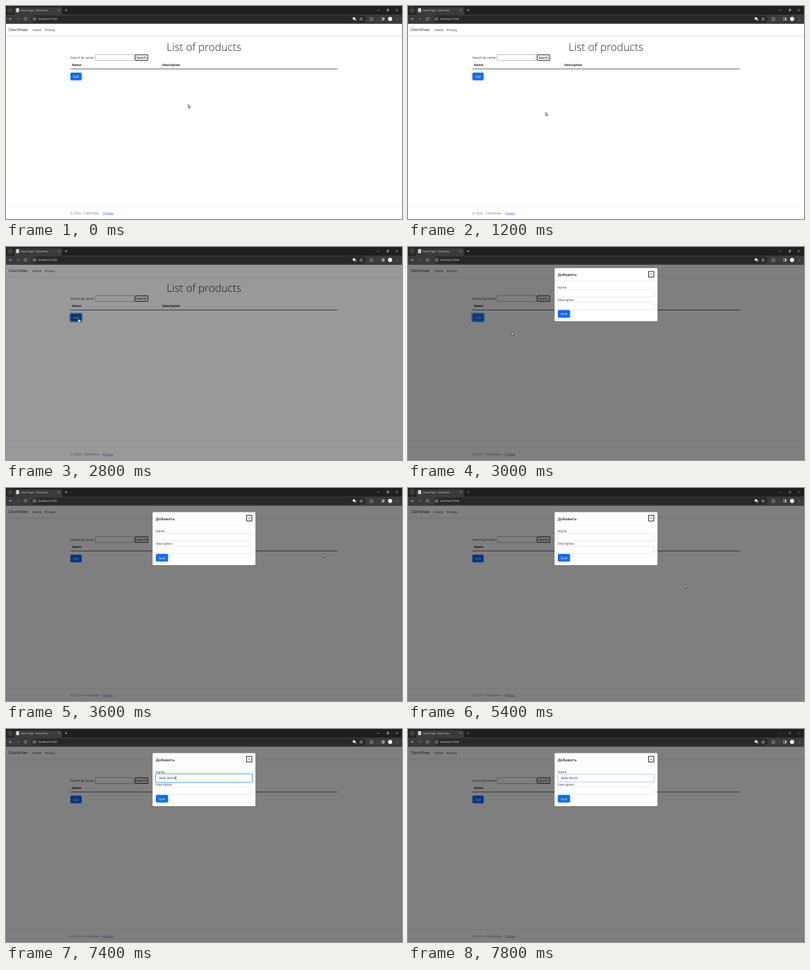
An HTML page with a canvas for the animation above (8 s loop, 600 by 323 pixels).

```html
<!DOCTYPE html>
<html lang="en">
<head>
<meta charset="utf-8">
<title>List of products</title>
<style>
html, body { margin: 0; width: 100%; height: 100%; overflow: hidden; background: #fff; }
canvas { display: block; width: 600px; height: 323px; }
</style>
</head>
<body>
<canvas id="stage"></canvas>
<script>
const W = 600, H = 323, LOOP = 8000, STEP = 200;
const INK = '#212529', BLUE = '#0d6efd', RING = '#258cfb', RULE = '#dee2e6';
const FONT = '"Open Sans", "Noto Sans", sans-serif';
const canvas = document.getElementById('stage');
const ctx = canvas.getContext('2d');
const dpr = window.devicePixelRatio || 1;
canvas.width = W * dpr;
canvas.height = H * dpr;

function text(str, x, y, { size = 4.7, color = INK, weight = 400, align = 'left' } = {}) {
  ctx.font = `${weight} ${size}px ${FONT}`;
  ctx.textAlign = align;
  ctx.fillStyle = color;
  ctx.fillText(str, x, y);
}

function rect(x, y, w, h, color) {
  ctx.fillStyle = color;
  ctx.fillRect(x, y, w, h);
}

function box(x, y, w, h, r, fill, stroke, width = 0.5) {
  ctx.beginPath();
  ctx.roundRect(x, y, w, h, r);
  if (fill) { ctx.fillStyle = fill; ctx.fill(); }
  if (stroke) { ctx.strokeStyle = stroke; ctx.lineWidth = width; ctx.stroke(); }
}

// Strokes an SVG path placed at x, y
function icon(path, x, y, color, width = 0.6, fill) {
  ctx.save();
  ctx.translate(x, y);
  const p = new Path2D(path);
  if (fill) { ctx.fillStyle = fill; ctx.fill(p); }
  ctx.strokeStyle = color;
  ctx.lineWidth = width;
  ctx.stroke(p);
  ctx.restore();
}

function dot(x, y, r, color) {
  ctx.beginPath();
  ctx.arc(x, y, r, 0, Math.PI * 2);
  ctx.fillStyle = color;
  ctx.fill();
}

function focusRing(x, y, w, h, strength) {
  if (!strength) return;
  const grow = 1.25 * strength;
  ctx.globalAlpha = strength;
  box(x - grow, y - grow, w + 2 * grow, h + 2 * grow, 2.2, RING);
  box(x - 0.5, y - 0.5, w + 1, h + 1, 1.6, '#fff');
  ctx.globalAlpha = 1;
}

function drawBrowser(active) {
  const light = '#d6d6d6', frame = active ? '#e3e3e3' : '#858585';
  rect(0, 0, W, 13, '#1f1f1f');
  rect(0, 13, W, 14, '#3b3b3b');
  box(1.6, 1.6, 9.6, 9.6, 3, '#363636');
  icon('M-1.2 -.6 L0 .6 L1.2 -.6', 6.4, 6.4, light);
  box(12.5, 2, 72.5, 12, [3, 3, 0, 0], '#3b3b3b');
  box(15.4, 3.6, 4.3, 5.6, 0.4, '#f4f4f4');
  icon('M.8 2 H2.4 M.8 3.1 H3.4 M.8 4.2 H3.4', 15.4, 3.6, '#777', 0.4);
  text('Home Page - ClientView', 22.3, 7.9, { size: 3.65, color: '#e3e3e3' });
  icon('M-1.2 -1.2 L1.2 1.2 M1.2 -1.2 L-1.2 1.2', 80.3, 6.4, light, 0.5);
  icon('M-1.7 0 H1.7 M0 -1.7 V1.7', 91.2, 6.3, frame);
  icon('M-1.6 0 H1.6', 564, 6.4, frame, 0.5);
  icon('M-1.5 -.6 H.7 V1.6 H-1.5 Z M-.6 -.6 V-1.5 H1.6 V.7 H.7', 578.4, 6.2, frame, 0.5);
  icon('M-1.6 -1.6 L1.6 1.6 M1.6 -1.6 L-1.6 1.6', 592.3, 6.2, frame, 0.5);

  icon('M2 0 H-1.9 M-.1 -1.8 L-1.9 0 L-.1 1.8', 7, 19.6, light);
  icon('M-2 0 H1.9 M.1 -1.8 L1.9 0 L.1 1.8', 18.2, 19.6, '#7d7d7d');
  icon('M1.5 -1.1 A1.9 1.9 0 1 0 1.8 .6 M1.9 -2.1 V-.6 H.4', 29.4, 19.6, light);
  box(38, 14.3, 507, 11, 5.5, '#282828');
  dot(43, 19.7, 4.1, '#3b3b3b');
  icon('M-1.8 -1 H.3 M1.8 1 H-.3', 43, 19.7, light, 0.5);
  icon('M1.8 -1 A.6 .6 0 1 0 .6 -1 A.6 .6 0 1 0 1.8 -1 M-.6 1 A.6 .6 0 1 0 -1.8 1 A.6 .6 0 1 0 -.6 1', 43, 19.7, light, 0.45);
  text('localhost:7244', 49, 21.3, { size: 4.2, color: '#e8e8e8' });
  box(525.4, 16.9, 3.6, 4.2, 0.4, light);
  icon('M-.9 -1.4 H1.1 V1.8 H-1.6 M-.2 .9 L.4 -.6 L1 .9', 529.5, 20.4, light, 0.45);
  icon('M0 -2.3 L.7 -.7 L2.3 -.6 L1.1 .5 L1.5 2.1 L0 1.2 L-1.5 2.1 L-1.1 .5 L-2.3 -.6 L-.7 -.7 Z', 538, 19.7, light, 0.55);
  icon('M-2 -1.4 H-.7 A.7 .7 0 0 1 .7 -1.4 H1.6 V-.3 A.7 .7 0 0 1 1.6 1.1 V2.1 H-2 Z', 553.8, 19.6, light);
  rect(562.2, 17.2, 0.4, 5, '#5c5c5c');
  icon('M-2 -1.9 H2 V1.9 H-2 Z', 571, 19.6, light);
  rect(571.4, 17.7, 1.6, 3.8, light);
  dot(582, 19.6, 3.1, '#fff');
  for (const dy of [-1.7, 0, 1.7]) dot(593, 19.6 + dy, 0.45, light);
}

function drawPage({ addColor, addRing }) {
  rect(0, 27, W, H - 27, '#fff');
  const shade = ctx.createLinearGradient(0, 44.6, 0, 50);
  shade.addColorStop(0, '#f3f3f3');
  shade.addColorStop(1, '#fff');
  rect(0, 44.6, W, 5.4, shade);
  rect(0, 44.5, W, 0.4, RULE);
  text('ClientView', 3.8, 38.4, { size: 6 });
  text('Home', 40.2, 38);
  text('Privacy', 58.8, 38);

  text('List of products', 300, 67.7, { size: 16.3, weight: 300, align: 'center' });
  text('Search by name:', 97.6, 80);
  box(135.2, 73.7, 58.8, 9, 0.5, '#fff', '#767676');
  box(195.9, 73.9, 19, 8.7, 0, '#efefef', '#111', 0.85);
  text('Search', 205.4, 80, { color: '#000', align: 'center' });
  text('Name', 99.9, 91.1, { weight: 700, color: '#111' });
  text('Description', 237, 91.1, { weight: 700, color: '#111' });
  rect(97.5, 95.3, 405, 0.7, INK);
  focusRing(97.5, 101, 17.2, 11.7, addRing);
  box(97.5, 101, 17.2, 11.7, 1.7, addColor);
  text('Add', 106.1, 108.6, { color: '#fff', align: 'center' });

  rect(0, 303.8, W, 0.4, '#ced4da');
  text('© 2024 - ClientView -', 97.6, 315.6, { size: 4.8, color: '#6c757d' });
  text('Privacy', 147, 315.6, { color: BLUE });
  rect(147, 316.2, 15.2, 0.4, BLUE);
}

function drawModal(top, { ring, value, caret }) {
  ctx.save();
  ctx.translate(0, top);
  box(222, 0, 156, 80.4, 1.4, '#fff', 'rgba(0,0,0,.2)', 0.3);
  text('Добавить', 227, 12, { size: 5.85, weight: 600 });
  box(364.4, 4.9, 8.2, 8.7, 0, '#efefef', '#111', 0.9);
  icon('M-1 -1 L1 1 M1 -1 L-1 1', 368.5, 9.4, '#222', 0.5);
  rect(222, 19.3, 156, 0.4, RULE);
  text('Name', 227, 30.7);
  text('Description', 227, 49.8);
  focusRing(227.1, 32.2, 145.7, 11.6, ring);
  box(227.1, 32.2, 145.7, 11.6, 1.5, '#fff', ring ? '#86b7fe' : '#ced4da');
  box(227.1, 51.5, 145.7, 11.6, 1.5, '#fff', '#ced4da');
  box(227, 63.4, 18.6, 11.7, 1.7, BLUE);
  text('Save', 236.3, 71, { color: '#fff', align: 'center' });
  text(value, 231.4, 39.9);
  if (caret) rect(value ? 257.2 : 231.3, 34.6, 0.5, 6.6, '#000');
  ctx.restore();
}

const SHAPES = {
  arrow: 'M0 0 V5 L1.2 4 L2 5.7 L2.8 5.4 L2.1 3.7 H3.6 Z',
  hand: 'M-.4 0 Q.2 -.5 .6 0 V1.9 L2.9 2.5 Q3.4 2.8 3.2 3.8 L2.7 6 H-.3 L-2 3.7 Q-2 2.9 -1.3 3.2 L-.4 3.8 Z'
};

function drawCursor(x, y, kind) {
  if (kind === 'beam') icon('M-1 -2.6 H1 M0 -2.6 V2.6 M-1 2.6 H1', x, y, '#000', 0.5);
  else icon(SHAPES[kind], x, y, '#000', 0.55, '#fff');
}

// Pointer stops: time, then x, y and shape; a bare time means off stage
const STOPS = [
  [0, 276, 149.3], [200, 262, 130], [400, 230, 96], [600, 201.5, 74.5], [800, 203, 100],
  [1000, 206, 140], [1200, 208.5, 161], [1400, 245, 152.5], [1600, 277, 158],
  [2000, 205, 132], [2200, 140, 112], [2400, 112, 109, 'hand'], [2800, 110, 108, 'hand'],
  [3000, 157, 129.3], [3200, 260, 135], [3400, 390, 118], [3600, 480, 100],
  [4400, 560, 85], [4600],
  [5400, 419.6, 147], [5600, 335, 106], [5800, 300, 75, 'beam'], [6200, 430, 108],
  [6400, 535.4, 130], [6600]
];

function draw(t) {
  ctx.setTransform(dpr, 0, 0, dpr, 0, 0);
  ctx.textRendering = 'geometricPrecision';
  const between = (a, b) => t >= a && t < b;
  const open = t >= 2800;

  drawBrowser(!between(4600, 5800) && t < 7800);
  drawPage({
    addColor: between(2400, 2800) ? '#0b5ed7' : between(2800, 3000) ? '#0a58ca' : BLUE,
    addRing: between(2800, 3200) ? 1 : 0
  });
  if (open) rect(0, 27, W, H - 27, `rgba(0,0,0,${t < 3000 ? 0.4 : 0.5})`);
  if (t >= 3000) {
    drawModal(t < 3200 ? 32.1 : 36.5, {
      ring: t >= 7800 ? 0.45 : t >= 5800 ? 1 : 0,
      value: t >= 6200 ? 'Hello World' : '',
      caret: between(5800, 6800) || between(7400, 7800)
    });
  }
  const [, x, y, kind = 'arrow'] = STOPS.findLast(s => s[0] <= t);
  if (x !== undefined) drawCursor(x, y, kind);
}

const start = performance.now();
function tick() {
  const t = (performance.now() - start) % LOOP;
  draw(Math.floor(t / STEP) * STEP);
  requestAnimationFrame(tick);
}
tick();
</script>
</body>
</html>
```
